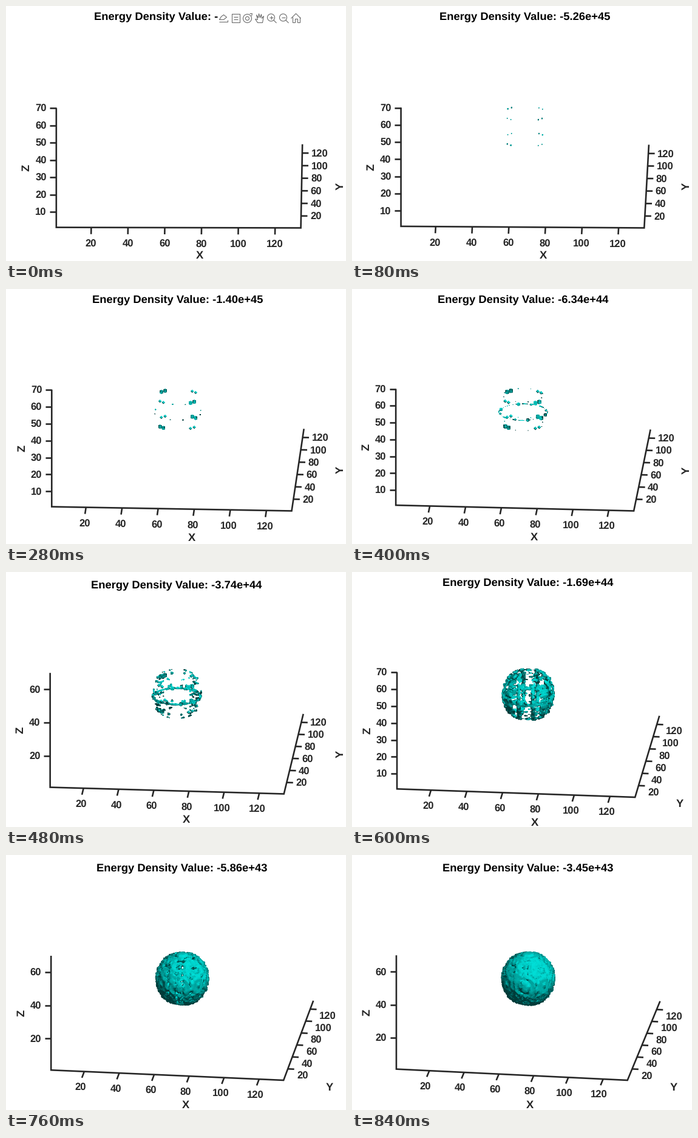
A matplotlib script that plays this animation: 560 px wide and 420 px high, repeating every 0.88 s.

```python
import matplotlib.pyplot as plt
import numpy as np
from matplotlib.animation import FuncAnimation
from matplotlib.collections import PolyCollection
from matplotlib.patches import Circle, Rectangle

W, H, DPI = 560, 420, 100
FRAMES, INTERVAL = 22, 40
PX = 72 / DPI
INK = (0.15, 0.15, 0.15)
ELEV = np.radians(20)
STEP = 0.1149           # decades of energy per frame
FLIP = 15               # frame at which the Y label turns upright
TICK, LABEL = 16.67, 18.33
LO, XY_HI, Z_HI = 1, 134, 70

plt.rcParams["font.family"] = "Liberation Sans"
plt.rcParams["font.weight"] = "bold"
plt.rcParams["text.hinting"] = "none"


# --- energy density on a grid around the bubble ---
N = 36
axis = np.arange(N) - (N - 1) / 2
X, Y, Z = np.meshgrid(axis, axis, axis, indexing="ij")


def density():
    """Shell of ribs and beads, an equatorial ring and sixteen hot spots."""
    a = np.minimum(abs(X), abs(Y))
    b = np.maximum(abs(X), abs(Y))
    c = abs(Z)
    noise = (np.sin(a * 12.99 + b * 78.23 + c * 37.72 + a * b) * 43758.55) % 1
    ribs = np.cos(2 * np.pi * (a - 4) / 5)
    beads = np.cos(2 * np.pi * c / 2.8)
    log = -1.6 + 0.4 * ribs + 0.25 * beads - 0.6 * noise
    r = np.sqrt(X**2 + Y**2 + Z**2)
    log[abs(r - 14.25) > 0.65] = -6
    low = Z == -1.5
    ring = -1.1 - 0.8 * ((np.hypot(X, Y) - 13.4) / 0.8) ** 2
    log = np.where(low, np.maximum(log, ring), log)
    log[low & (a == 3.5) & (b == 12.5)] = -0.72
    log[(a == 7.5) & (b == 9.5) & (c == 7.5)] = -0.12
    return 10 ** np.maximum(log, -6)


FIELD = density()
FLAT = FIELD.ravel()
NODES = np.stack([X, Y, Z], -1).reshape(-1, 3)
CELLS = np.arange(N**3).reshape(N, N, N)[:-1, :-1, :-1].ravel()
PARITY = np.indices((N - 1,) * 3).sum(0).ravel() % 2
CORNERS = np.array([(c >> 2) * N * N + (c >> 1 & 1) * N + (c & 1)
                    for c in range(8)])
# crossed edges per triangle, by number of corners inside
CASES = {
    1: [((0, 0, 0), (1, 2, 3))],
    2: [((0, 0, 1), (2, 3, 3)), ((0, 1, 1), (2, 3, 2))],
    3: [((0, 1, 2), (3, 3, 3))]}


def tetrahedra():
    """Split each cell into five, mirrored from one cell to the next."""
    for parity in (0, 1):
        cells = CELLS[PARITY == parity][:, None]
        inner = [c for c in range(8) if bin(c).count("1") % 2 == parity]
        yield cells + CORNERS[inner]
        for c in set(range(8)) - set(inner):
            yield cells + CORNERS[[c, c ^ 1, c ^ 2, c ^ 4]]


TETS = np.concatenate(list(tetrahedra()))


def isosurface(level):
    """Triangles, outward face directions and smooth normals."""
    clipped = np.minimum(FIELD, 1.6 * level)
    grad = np.stack(np.gradient(clipped), -1).reshape(-1, 3)
    inside = (FLAT[TETS] > level).sum(1)
    tris, faces, normals = [], [], []
    for count, triangles in CASES.items():
        tet = TETS[inside == count]
        tet = np.take_along_axis(tet, np.argsort(-FLAT[tet], 1), 1)
        out = NODES[tet[:, count:]].mean(1) - NODES[tet[:, :count]].mean(1)
        for start, end in triangles:
            i, j = tet[:, list(start)], tet[:, list(end)]
            t = ((FLAT[i] - level) / (FLAT[i] - FLAT[j]))[..., None]
            tri = NODES[i] + t * (NODES[j] - NODES[i])
            face = np.cross(tri[:, 1] - tri[:, 0], tri[:, 2] - tri[:, 0])
            face *= np.sign((face * out).sum(1))[:, None]
            tris.append(tri)
            faces.append(face)
            normals.append(-(grad[i] + t * (grad[j] - grad[i])).mean(1))
    return [np.concatenate(part) for part in (tris, faces, normals)]


# --- view ---
def camera(k):
    """Rows: screen right, screen up, towards the viewer."""
    az = np.radians(0.365 * (k + 1))
    s, c = np.sin(az), np.cos(az)
    se, ce = np.sin(ELEV), np.cos(ELEV)
    return np.array([[c, s, 0], [-s * se, c * se, ce], [s * ce, -c * ce, se]])


def fit(k, cam):
    """Scale the box to the free height; a small box gets fewer Z ticks."""
    side, tall = XY_HI - LO, Z_HI - LO
    spread_x = side * (cam[0, 0] + cam[0, 1])
    spread_y = side * (cam[1, 1] - cam[1, 0]) + tall * cam[1, 2]
    early = k < FLIP
    height = 335 if early else 340
    sparse = height / spread_y < 2.945
    height -= 4 * sparse
    scale = height / spread_y
    mid = 285 - 0.36 * k if early else 289.7
    bottom = 365 if early else 370.5
    left = np.array([mid - spread_x * scale / 2,
                     bottom + side * cam[1, 0] * scale])
    return scale, left, (mid, bottom - height - 15), 20 if sparse else 10


fig = plt.figure(figsize=(W / DPI, H / DPI), dpi=DPI, facecolor="white")
ax = fig.add_axes([0, 0, 1, 1])


def line(points, width=2.6, color=INK, **kw):
    xs, ys = zip(*points)
    ax.plot(xs, ys, color=color, lw=width * PX, solid_capstyle="butt",
            solid_joinstyle="miter", **kw)


def text(x, y, s, size, ha="center", turned=False, color=INK):
    """Place text with its capitals centred on (x, y)."""
    drop = 0.36 * size
    pos = (x + drop, y) if turned else (x, y + drop)
    ax.text(*pos, s, size=size * PX, color=color, ha=ha, va="baseline",
            rotation=90 if turned else 0, rotation_mode="anchor")


def unit(v):
    return v / np.hypot(*v)


def draw_axes(k, cam, origin, scale, gap):
    def at(x, y, z):
        p = cam @ np.array([x - LO, y - LO, z - LO]) * scale
        return origin + np.array([p[0], -p[1]])

    corner = at(XY_HI, LO, LO)
    back = at(XY_HI, XY_HI, LO)
    top = at(LO, LO, Z_HI)
    line([top, origin, corner, back])

    early = k < FLIP
    x_dir, y_dir = unit(corner - origin), unit(back - corner)
    lean = back[0] - corner[0]
    for v in range(20, 121, 20):
        p = at(v, LO, LO)
        line([p, p - 11 * y_dir])
        text(p[0] - 0.12 * lean, p[1] + 26.3 - 0.02 * lean, v, TICK)
        p = at(XY_HI, v, LO)
        line([p, p + 10.5 * x_dir])
        text(p[0] + 15, p[1] + (0.5 if early else 11), v, TICK, ha="left")
    for v in range(gap, Z_HI + 1, gap):
        p = at(LO, LO, v)
        line([p, p - (10.5, 0)])
        text(p[0] - 16, p[1], v, TICK, ha="right")

    x_mid, y_mid = (origin + corner) / 2, (corner + back) / 2
    text(x_mid[0] + 35 - 0.1 * lean, x_mid[1] + 44.5 + 0.07 * lean, "X", LABEL)
    if early:
        text(548.5, y_mid[1], "Y", LABEL, turned=True)
    else:
        text(y_mid[0] + 67 - 0.33 * lean, y_mid[1] + 76, "Y", LABEL)
    text(origin[0] - 50.5, (origin[1] + top[1]) / 2, "Z", LABEL, turned=True)
    return at(67.5, 67.5, 35.3)


def draw_bubble(k, cam, center, scale):
    tris, faces, normals = isosurface(10 ** (-STEP * k))
    front = faces @ cam[2] > 0
    tris, normals = tris[front] @ cam.T, normals[front] @ cam.T
    order = np.argsort(tris[..., 2].mean(1))
    tris, normals = tris[order], normals[order]
    normals /= np.linalg.norm(normals, axis=1, keepdims=True) + 1e-9
    shade = 0.25 + 0.7 * np.clip(normals @ (0.25, 0.45, 0.86), 0, 1)
    polys = center + tris[..., :2] * (scale, -scale)
    colors = shade[:, None] * (0, 0.93, 0.9)
    ax.add_collection(PolyCollection(polys, facecolors=colors,
                                     edgecolors="face", linewidths=0.5 * PX),
                      autolim=False)


def draw_toolbar():
    gray = (0.42, 0.42, 0.42)
    ax.add_patch(Rectangle((348.5, 8), 140, 24, fc="white", ec="none", zorder=5))

    def stroke(x, *points):
        line([(x + dx, 20 + dy) for dx, dy in points], 1.1, gray, zorder=6)

    def ring(x, y, r):
        ax.add_patch(Circle((x, y), r, fill=False, ec=gray, lw=1.1 * PX, zorder=6))

    export, tip, turn, pan, zoom_in, zoom_out, home = range(357, 478, 20)
    stroke(export, (-7, 6), (7, 6), (7, 3))
    stroke(export, (-6, 2), (-3, -3), (1, -6), (6, -2), (1, 2), (-6, 2))
    stroke(tip, (-6, -7), (7, -7), (7, 7), (-6, 7), (-6, -7))
    for dy in (-2, 2):
        stroke(tip, (-3, dy), (4, dy))
    ring(turn, 20, 7)
    ring(turn, 20, 3)
    stroke(turn, (4, -8), (8, -8), (7, -4))
    stroke(pan, (-3, 7), (-7, 1), (-3, 2), (-5, -6), (-2, -1), (-1, -8),
           (1, -1), (3, -7), (4, 0), (7, -4), (5, 7), (-3, 7))
    for x in (zoom_in, zoom_out):
        ring(x - 1, 18.5, 6)
        stroke(x, (3, 2.5), (8, 7.5))
        stroke(x, (-4, -1.5), (2, -1.5))
    stroke(zoom_in, (-1, -4.5), (-1, 1.5))
    stroke(home, (-8, 0), (0, -8), (8, 0))
    stroke(home, (-6, -2), (-6, 7), (-2, 7), (-2, 1), (2, 1), (2, 7), (6, 7),
           (6, -2))


def update(k):
    ax.cla()
    ax.set_xlim(-0.5, W - 0.5)
    ax.set_ylim(H - 0.5, -0.5)
    ax.axis("off")
    cam = camera(k)
    scale, origin, title, gap = fit(k, cam)
    center = draw_axes(k, cam, origin, scale, gap)
    draw_bubble(k, cam, center, scale)
    energy = 5.264e45 * 10 ** (-STEP * (k - 2))
    text(*title, f"Energy Density Value: -{energy:.2e}", LABEL, color="black")
    if k == 0:
        draw_toolbar()
    return []


anim = FuncAnimation(fig, update, frames=FRAMES, interval=INTERVAL,
                     init_func=lambda: [], repeat=True, repeat_delay=0)
plt.show()
```
